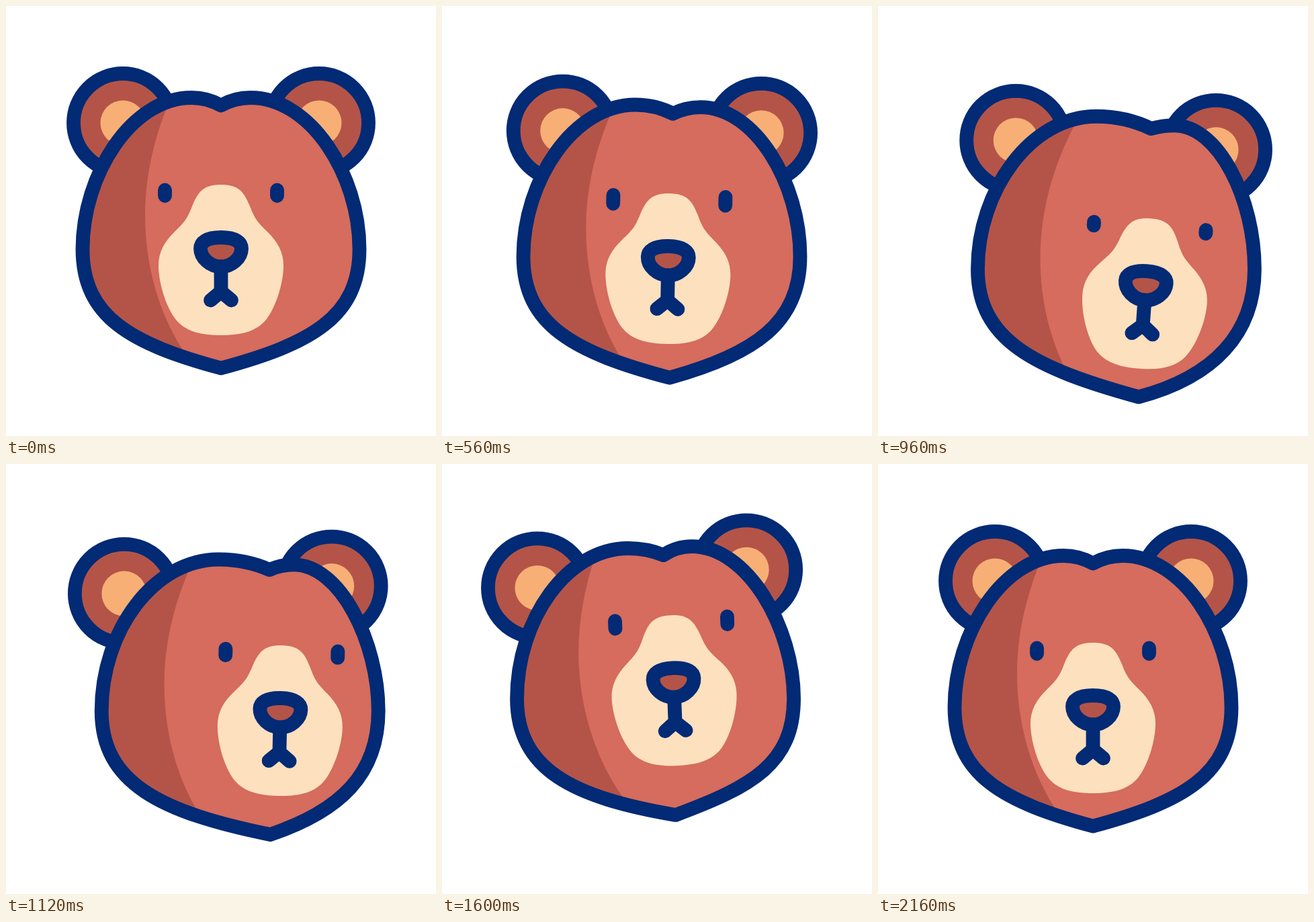
Write an HTML page with a canvas that moves like this. It is 640x640 px and loops after 2.4 s.

```html
<!DOCTYPE html>
<html lang="en">
<head>
<meta charset="utf-8">
<title>Bear</title>
<style>
  html, body { margin: 0; width: 100%; height: 100%; overflow: hidden; background: #fff; }
  canvas { display: block; width: 640px; height: 640px; }
</style>
</head>
<body>
<canvas id="stage"></canvas>
<script>
const LOOP = 2400, STEP = 40, SIZE = 640;
const NAVY = '#022a75', RED = '#d56c5d', DARK = '#b45448',
      CREAM = '#fde0be', ORANGE = '#f7af75';

// The look around: time, face offset x and y, eye height.
const look = [
  [240, 0, 0, 8.5],
  [560, 16.5, 13, 12.5],
  [800, 56, 38, 0],
  [920, 73, 54, 4],
  [1120, 88, 4, 9.5],
  [1440, 44.5, -55.5, 13],
  [1800, 7, -9, 8.5],
  [2040, 0, 0, 8.5]
];

// Smooth curve through one column of the keys.
function sample(col, t) {
  const last = look.length - 1;
  if (t <= look[0][0]) return look[0][col];
  if (t >= look[last][0]) return look[last][col];
  let i = 0;
  while (t >= look[i + 1][0]) i++;
  const span = k => look[k + 1][0] - look[k][0];
  const slope = k => (look[k + 1][col] - look[k][col]) / span(k);
  const tangent = k => k === 0 || k === last ? 0
    : (slope(k - 1) * span(k) + slope(k) * span(k - 1)) / (span(k - 1) + span(k));
  const h = span(i), u = (t - look[i][0]) / h, w = 1 - u;
  return look[i][col] * (1 + 2 * u) * w * w + tangent(i) * h * u * w * w
       + look[i + 1][col] * u * u * (3 - 2 * u) - tangent(i + 1) * h * u * u * w;
}

// Every part follows the face; "turn" is the foreshortening of the head.
function pose(t) {
  const x = sample(1, t), y = sample(2, t);
  const turn = x * (1 - x / 100);
  const follow = (a, b, c) => a * x + b * y + c * turn;
  const swing = t > 1600 && t < 2160 ? Math.sin(2 * Math.PI * (t - 1600) / 560) : 0;
  return {
    face: { x, y },
    eye: Math.max(0, sample(3, t)),
    tilt: 0.012 * x + 0.064 * y,
    body: { x: follow(0.32, 0.22, -0.08), y: follow(0, 0.47, 0.34) },
    brow: { x: follow(0.75, 0.42, 0.42), y: follow(0.04, 0.5, 0.37) },
    chin: { x: follow(0.78, 0, 0.43), y: follow(0.07, 0.62, 0.37) },
    left: { x: follow(0.02, 0.68, -0.25) - 7 * swing, y: follow(0.14, 0.1, 0.58) + 5 * swing },
    right: { x: follow(0.19, 0.44, 0.02) - 7 * swing, y: follow(0, 0.63, 0.48) - 6 * swing }
  };
}

const canvas = document.getElementById('stage');
const ctx = canvas.getContext('2d');
const ratio = window.devicePixelRatio || 1;
canvas.width = canvas.height = SIZE * ratio;

const rad = deg => deg * Math.PI / 180;

const muzzle = new Path2D(`M320 266 C346 266 354 276 363 298 C371 319 376 323 390 337
  C404 351 413 366 413 386 C413 412 402 448 387 467 C373 484 351 490 320 490
  C289 490 267 484 253 467 C238 448 227 412 227 386 C227 366 236 351 250 337
  C264 323 269 319 277 298 C286 276 294 266 320 266 Z`);
const nose = new Path2D(`M320 344.5 C342 344.5 350.5 352 350.5 361 C350.5 375 336 388 320 388
  C304 388 289.5 375 289.5 361 C289.5 352 298 344.5 320 344.5 Z`);
const mouth = new Path2D('M320 388 V425 M304.5 438 L320 425 L335.5 438');
const shade = new Path2D(`M0 100 L253 116 L239 152 C220 200 207 255 207 312
  C207 390 230 460 262 510 L282 541 L200 640 L0 640 Z`);

function fill(path, color) {
  ctx.fillStyle = color;
  ctx.fill(path);
}

function disc(x, y, r) {
  const path = new Path2D();
  path.arc(x, y, r, 0, 2 * Math.PI);
  return path;
}

function drawEar(x, y) {
  const outer = disc(x, y, 73.5);
  fill(outer, DARK);
  fill(disc(x, y, 33.5), ORANGE);
  ctx.stroke(outer);
}

function headPath({ body, brow, chin, tilt }) {
  const top = { x: 320 + brow.x, y: 148 + brow.y };
  const tip = { x: 320 + chin.x, y: 539 + chin.y };
  const sideY = 362 + body.y;
  const yaw = chin.x - body.x;
  const lean = 0.04 * brow.x + 0.8 * tilt;

  // Outline of one half from brow to chin; dir is -1 for left, 1 for right.
  const half = dir => {
    const mix = dir < 0 ? 0.28 : 0.82;
    const lobeX = 320 + dir * 44 + body.x + (brow.x - body.x) * mix;
    const lobeY = 136.5 + brow.y + dir * lean;
    const sideX = 320 + dir * 206 + body.x;
    const gap = lobeX - top.x, rise = top.y - lobeY;
    const jaw = 0.65 * (sideX - tip.x);
    const jawRise = jaw * (Math.tan(rad(tilt)) - 0.002 * yaw) - 0.27 * Math.abs(jaw);
    return [
      [top.x, top.y],
      [top.x + 0.3 * gap, top.y - 0.65 * rise],
      [lobeX - 0.37 * gap, lobeY], [lobeX, lobeY],
      [lobeX + 0.55 * (sideX - lobeX), lobeY],
      [sideX, sideY - 111 + dir * 0.2 * yaw], [sideX, sideY],
      [sideX, sideY + 101 - dir * 0.15 * yaw],
      [tip.x + jaw, tip.y + jawRise], [tip.x, tip.y]
    ];
  };

  const path = new Path2D();
  const curves = pts => {
    for (let i = 1; i < pts.length; i += 3) {
      path.bezierCurveTo(...pts[i], ...pts[i + 1], ...pts[i + 2]);
    }
  };
  path.moveTo(top.x, top.y);
  curves(half(1));
  curves(half(-1).reverse());
  path.closePath();
  return path;
}

function drawHead(p) {
  const head = headPath(p);
  fill(head, RED);
  ctx.save();
  ctx.clip(head);
  ctx.translate(207 + p.body.x, 330 + p.body.y);
  ctx.rotate(rad(p.tilt * 1.2));
  ctx.translate(-207, -330);
  fill(shade, DARK);
  ctx.restore();
  ctx.stroke(head);
}

function drawFace({ face, tilt, eye }) {
  ctx.save();
  ctx.translate(320 + face.x, 378 + face.y);
  ctx.rotate(rad(tilt));
  ctx.translate(-320, -378);
  fill(muzzle, CREAM);
  fill(nose, DARK);
  ctx.stroke(nose);
  ctx.stroke(mouth);
  for (const x of [236.5, 403.5]) {
    ctx.beginPath();
    ctx.moveTo(x, 282.5);
    ctx.lineTo(x, 282.49 - eye);
    ctx.stroke();
  }
  ctx.restore();
}

function draw(time) {
  const p = pose(time);
  ctx.setTransform(ratio, 0, 0, ratio, 0, 0);
  ctx.fillStyle = '#fff';
  ctx.fillRect(0, 0, SIZE, SIZE);
  ctx.strokeStyle = NAVY;
  ctx.lineWidth = 20.8;
  ctx.lineCap = ctx.lineJoin = 'round';
  drawEar(174 + p.left.x, 174 + p.left.y);
  drawEar(466 + p.right.x, 174 + p.right.y);
  drawHead(p);
  drawFace(p);
}

const start = performance.now();
function tick() {
  const t = (performance.now() - start) % LOOP;
  draw(Math.floor(t / STEP) * STEP);
  requestAnimationFrame(tick);
}
tick();
</script>
</body>
</html>
```
